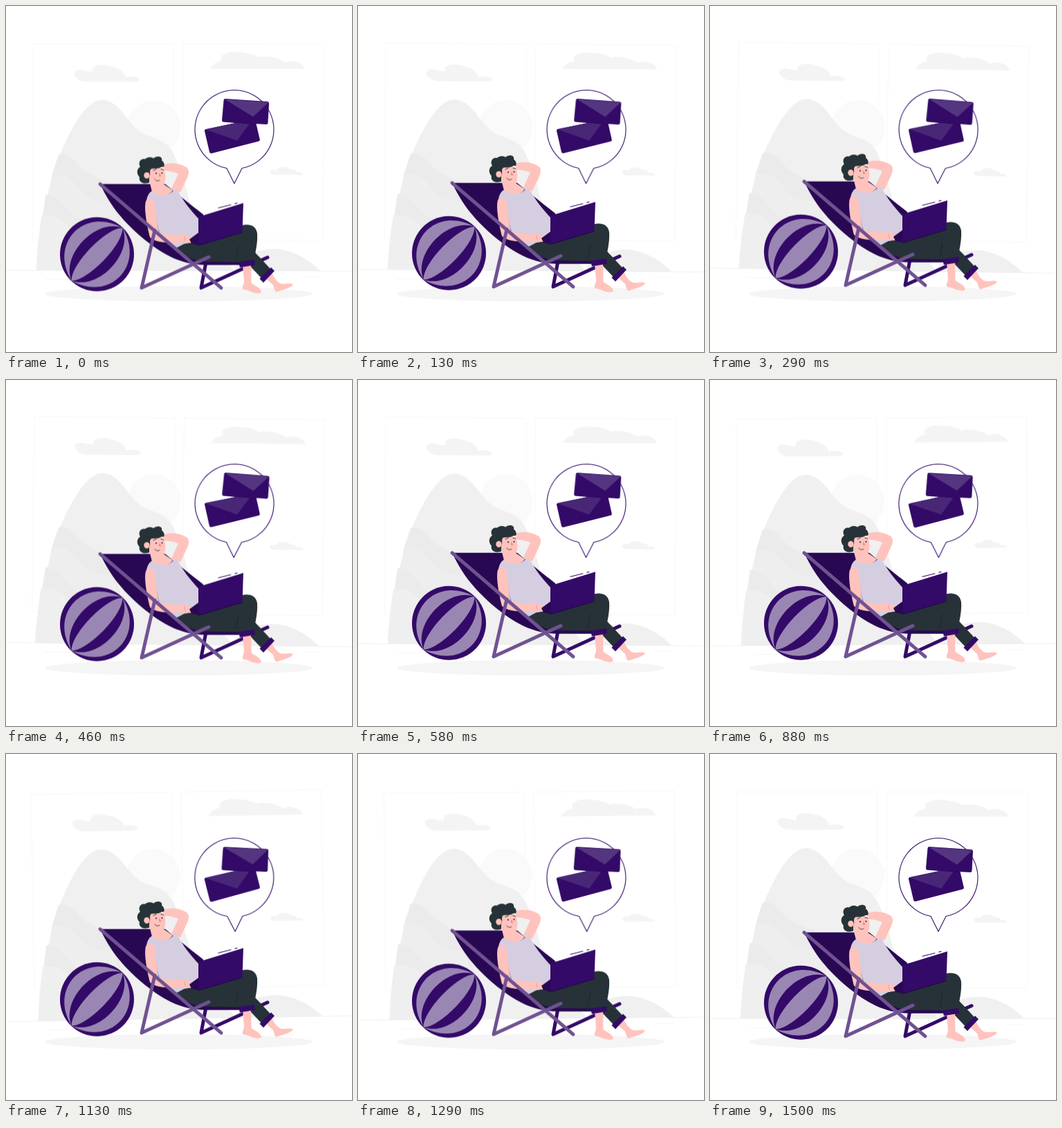
Recreate the animation shown at these times as an HTML page. Size 500 px wide and 500 px high, loop 1.54 s.

```html
<!DOCTYPE html>
<html lang="en">
<head>
<meta charset="utf-8">
<title>Mail by the beach</title>
<style>
  html, body { margin: 0; width: 100%; height: 100%; overflow: hidden; background: #fff; }
  svg { display: block; width: 100%; height: 100%; }
  #scene { transform-origin: 250px 225px; }
  #bubble { transform-origin: 330px 189px; }
  .main { fill: #330a68; }
  .deep { fill: #290853; }
  .flap { fill: #54357f; }
  .skin { fill: #ffc3bd; }
  .dark { fill: #263238; }
  .cloud { fill: #f4f4f4; }
  .line { fill: none; stroke-linecap: round; stroke-linejoin: round; }
  .near { stroke: #705292; stroke-width: 5; }
  .far { stroke: #330a68; stroke-width: 5; }
  .thin { stroke: #330a68; stroke-width: 1.1; }
  .ink { stroke: #263238; stroke-width: .9; }
  .pane { fill: none; stroke: #f8f8f8; }
</style>
</head>
<body>
<svg viewBox="0 0 500 500">
  <g id="scene">
    <rect class="pane" x="39" y="55" width="203" height="283"/>
    <rect class="pane" x="255.500" y="55" width="203" height="283"/>
    <path d="M0 382.500H500" stroke="#f0f0f0"/>
    <path d="M57 395.500H120M430 391H455" stroke="#f6f6f6"/>
    <circle cx="213.500" cy="175.500" r="39" fill="#fafafa"/>
    <path fill="#f0f0f0" d="M330 382C338 358 365 350 392 351C418 353 440 368 454 382Z"/>
    <path fill="#f0f0f0" d="M44 382C47 335 58 268 76 220C94 174 117 136 138 136C162 136 172 163 190 179C206 192 226 189 239 208C256 238 264 280 275 320L330 382Z"/>
    <path fill="#ebebeb" d="M76 215C96 210 103 234 118 241C132 248 134 252 150 254L172 330L60 350L66 246Z"/>
    <path fill="#eeeeee" d="M66 246C90 240 100 256 110 268C122 280 135 284 155 283L172 350L50 360Z"/>
    <path fill="#ebebeb" d="M57.500 273C75 274 82 286 92 298C100 308 112 310 124 310L130 372L48 340Z"/>
    <path fill="#efefef" d="M51.500 304C68 301 82 308 90 318L130 382H44C45 355 48 328 51.500 304Z"/>
    <path class="cloud" d="M112 109.500C99 107 93 95 103 93C110 91 119 96 125 95C122 86 135 83 150 87C165 90 173 98 172 103C180 101 192 102 193 106C192 110 185 109.500 180 109.500Z"/>
    <path class="cloud" d="M295 90.500C299 83 305 80 312 79C306 72 318 66 330 66.500C345 66 360 70 364 74C375 70 395 75 403 81C415 76 431 83 431 90.500Z"/>
    <path class="cloud" d="M385 243.500C380 241 380 235 390 237C394 230 409 231 411 236C417 235 420 238 420 240C426 239 429 241 429 243.500Z"/>
  </g>

  <ellipse cx="249.500" cy="416" rx="193.500" ry="11" fill="#f5f5f5"/>

  <g id="bubble">
    <path class="line thin" d="M319 234.500A57 57 0 1 1 341 234.500L330 256.500Z" style="fill:#fff"/>
    <g stroke-linejoin="round">
      <path class="main" stroke="#330a68" stroke-width="5" d="M289.500 180.500L358 166L364.300 193L296.500 210.500Z"/>
      <path fill="#492777" d="M288 178.500L334 194.500L354 167L346 166Z"/>
      <path class="deep" d="M312 167.500L361 171L350 166Z"/>
      <path class="main" stroke="#330a68" stroke-width="5" d="M317 136.500L377.500 140.500L376 168.500L314.500 165Z"/>
      <path class="flap" d="M315.500 134.500L357 160L379.500 139Z"/>
    </g>
  </g>

  <g id="float"><g transform="translate(0 .8)">
    <g id="ball" transform="translate(131.500 358.500) rotate(-46)">
      <circle class="main" r="53.500"/>
    </g>

    <path class="line far" d="M378 363L282 407L289 370"/>
    <path class="deep" d="M136 257H230C246 270 266 286 285 301L300 366L360 367V374H290C250 374 224 356 201 338C162 306 147 280 136 257Z"/>

    <path class="skin" d="M226 230C236 225 251 226 261 233C266 237 264 244 261 250L252 269L239 264L249 242C243 240 236 238 230 238Z"/>
    <path class="skin" d="M206 248L212 272C222 278 236 274 241 266L229 258Z"/>

    <path class="skin" d="M374 392L384 385C388 394 393 400 398 401C405 402 412 399 415 402C414 406 400 410 391 413C387 411 388 407 386 403Z"/>
    <path class="dark" d="M358 354C366 362 377 374 385 383L371 395L354 377L350 362Z"/>
    <path class="main" d="M366.500 394L383 377.500L388 382.500L372 399.500Z"/>
    <path class="skin" d="M342 374L354 373L354.500 400C360 404 368 407 369 413C366 417 356 414 350 411L342 409C341 405 344 402 344 398Z"/>

    <path class="skin" d="M238 330L266 328L268 342L246 345Z"/>
    <path class="dark" d="M245 346L280 340L340 317C350 314 361 316 363 328C364 343 360 357 358 368L337 370L285 369C265 367 254 358 245 346Z"/>
    <path class="line" stroke="#1c262b" stroke-width="1" d="M336 346C334 354 334 360 332 366"/>
    <path class="main" d="M336 369.500L359 366.500L360 374L338 377.500Z"/>

    <path fill="#d5cee0" d="M211 267C220 277 238 274 243 264.500L248 266C255 280 266 294 278 307V328L262 341L247 349C235 345 224 334 220 322L213 292L203 281C204 274 207 269 211 267Z"/>
    <path fill="#b9aeca" d="M215 290C217 305 219 318 221 325L226 332L219 325Z"/>
    <path class="skin" d="M202 282C206 274 213 277 215 286C217 300 218 315 220 326C235 331 248 331 258 330C263 330 268 333 267 338C262 342 250 342 240 342C228 342 214 340 208 334C204 318 199 293 202 282Z"/>
    <path class="line" stroke="#e9958e" stroke-width=".8" d="M258 333L259 339"/>

    <path class="skin" d="M206 236C214 231 225 231 229 237C231 244 231 252 228 258C222 265 211 262 207 252Z"/>
    <path class="dark" d="M210 235C206 238 210 243 207 247L207 255C199 258 191 254 193 247C188 242 189 235 194 232C190 226 195 219 201 221C205 217 211 218 213 220C218 215 227 217 225 223C230 226 230 234 225 232C220 236 214 234 210 235Z"/>
    <ellipse class="skin" cx="203.500" cy="244.500" rx="4.200" ry="4.600"/>
    <circle class="dark" cx="217" cy="241.500" r="1.100"/>
    <circle class="dark" cx="225.500" cy="241" r="1.100"/>
    <path class="line ink" d="M213 237.500L217 235.500M224 235.500L228 236.500M215 250C217 253 220 253 222 251.500"/>
    <path fill="#f4827a" d="M221.500 241L224.500 246H221Z"/>

    <path class="deep" d="M265 337L280 326V346L268 343Z"/>
    <path class="main" d="M278 304.500L343 284.500L341.500 327L278.500 346Z"/>
    <path class="line" stroke="#22063f" stroke-width="1" d="M279 345.500L341 327"/>
    <path class="line thin" d="M307 291.500L325 287M331 285.300L334 284.500"/>

    <path class="line near" d="M215 324L196 407L293 362.500M136 257L311 407"/>
  </g></g>
</svg>
<script>
  const $ = id => document.getElementById(id);

  // Beach ball: lenses between the two poles, widest first
  const POLE = 53;
  const lens = h => {
    const x = POLE * .7, y = h * 4 / 3;
    return `M${-POLE} 0C${-x} ${-y} ${x} ${-y} ${POLE} 0C${x} ${y} ${-x} ${y} ${-POLE} 0Z`;
  };
  [[46, '#9a86b3'], [28, '#330a68'], [13, '#9a86b3']].forEach(([h, fill]) => {
    const p = document.createElementNS('http://www.w3.org/2000/svg', 'path');
    p.setAttribute('d', lens(h));
    p.setAttribute('fill', fill);
    $('ball').append(p);
  });

  // Linear motion, shown in 37 even steps per loop
  const play = (id, table, css) => $(id).animate(
    table.map(([offset, v]) => ({ offset, transform: css(v) })),
    { duration: 1540, delay: -4, iterations: Infinity, easing: 'steps(37, jump-start)' }
  );
  const sway = [[0, 0], [.25, 1], [.75, -1], [1, 0]];
  const bob = [[0, 0], [.5, -10], [1, 0]];
  const turn = v => `rotate(${v}deg)`;

  play('scene', sway, turn);
  play('bubble', sway, turn);
  play('float', bob, v => `translateY(${v}px)`);
</script>
</body>
</html>
```
